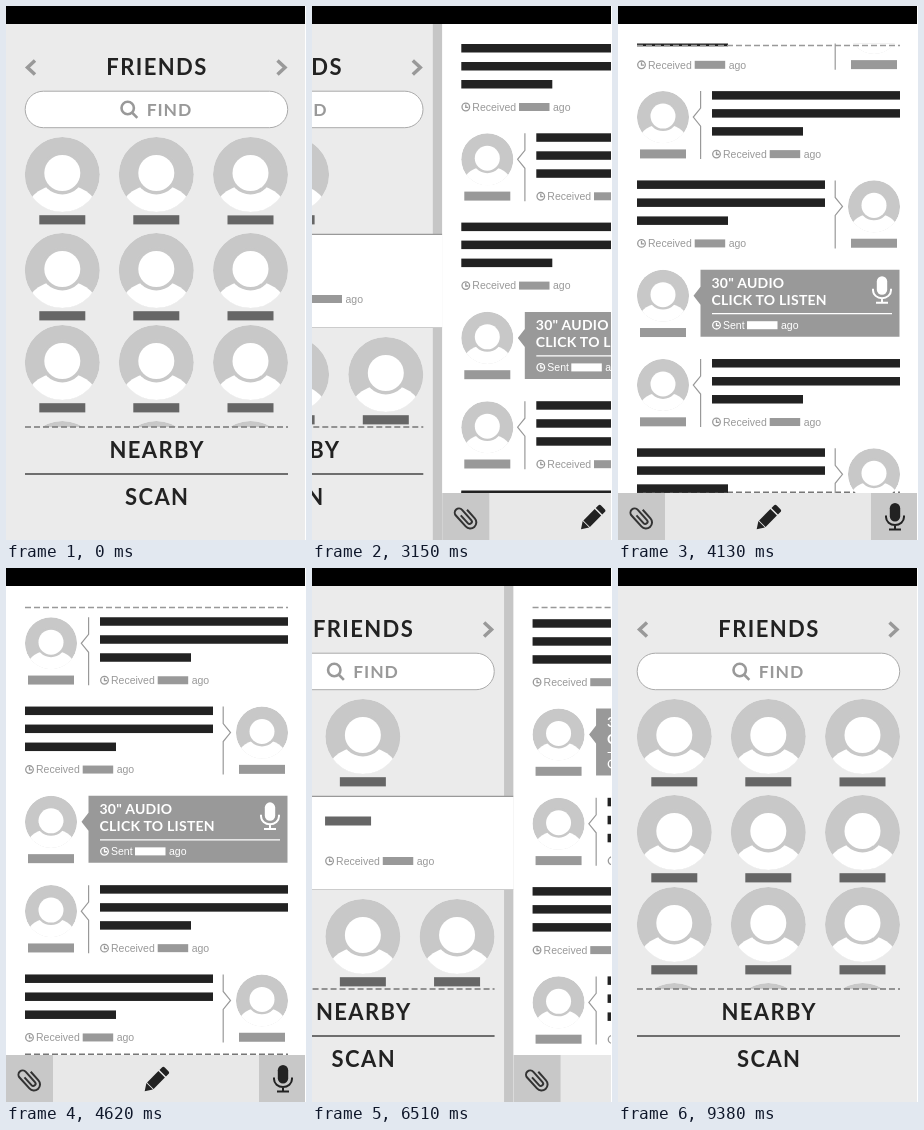
An HTML page for the animation above (9.45 s loop, 300 px wide and 534 px high).

```html
<!DOCTYPE html>
<html lang="en">
<head>
<meta charset="utf-8">
<title>Friends and messages</title>
<style>
  html, body { margin: 0; width: 100%; height: 100%; overflow: hidden; background: #fff; }
  svg { display: block; width: 100%; height: 100%; }
  text { font-family: Lato, "Open Sans", sans-serif; font-weight: 700; }
  .title { font-size: 22px; letter-spacing: 1.4px; fill: #222; text-anchor: middle; }
  .find { font-size: 17.5px; letter-spacing: .9px; fill: #999; }
  .audio { font-size: 14px; letter-spacing: .25px; fill: #fff; }
  .meta { font: 10.5px "Liberation Sans", Arial, sans-serif; }
  .line { fill: none; stroke: #999; }
</style>
</head>
<body>
<svg viewBox="0 0 300 534" preserveAspectRatio="none">
  <defs>
    <clipPath id="disc"><circle r="37.5"/></clipPath>
    <clipPath id="grid"><rect y="18" width="301" height="403"/></clipPath>
    <clipPath id="list"><rect y="37.5" width="300" height="449.5"/></clipPath>
    <g id="avatar" clip-path="url(#disc)">
      <circle r="37.5" fill="#c8c8c8"/>
      <ellipse cy="33" rx="34" ry="23" fill="#fff"/>
      <circle cy="-1.5" r="21.5" fill="#c8c8c8"/>
      <circle cy="-1.5" r="18" fill="#fff"/>
    </g>
    <g id="mic">
      <rect x="-5.2" y="-14" width="10.4" height="18.5" rx="5.2" fill="currentColor"/>
      <path d="M-9-1.5V0a9 8 0 0 0 18 0V-1.5M0 8V12.5M-6 12.6H6" fill="none" stroke="currentColor" stroke-width="2"/>
    </g>
  </defs>
  <g id="friends"></g>
  <g id="chat"></g>
  <rect width="300" height="18"/>
  <rect x="299" width="1" height="534" fill="#fff"/>
</svg>
<script>
const LOOP = 9450, STEP = 70, WIDTH = 301, PITCH = 89.3;
const $ = id => document.getElementById(id);

const rect = (x, y, w, h, fill) =>
  `<rect x="${x}" y="${y}" width="${w}" height="${h}" fill="${fill}"/>`;
const avatar = (x, y, s = 1) =>
  `<use href="#avatar" transform="translate(${x} ${y}) scale(${s})"/>`;
const dashes = (id, y, color) =>
  `<path id="${id}" class="line" d="M19 ${y}H282" style="stroke:${color}" stroke-width="1.4" stroke-dasharray="6 3"/>`;

// Clock, label, covered time and "ago", centred on y
function meta(x, y, label, color) {
  const gap = label === 'Sent' ? 35 : 57.7;
  return `<g fill="${color}">
    <g fill="none" stroke="${color}" stroke-width="1.3">
      <circle cx="${x + 4.5}" cy="${y}" r="3.8"/>
      <path d="M${x + 4.5} ${y - 2.5}V${y + .4}H${x + 7}"/>
    </g>
    <text class="meta" x="${x + 11}" y="${y + 3.8}">${label}</text>
    ${rect(x + gap, y - 4, 30.5, 8, color)}
    <text class="meta" x="${x + gap + 34}" y="${y + 3.8}">ago</text>
  </g>`;
}

const cell = (x, y) =>
  avatar(x, y + 37.5) + rect(x - 23, y + 78.2, 46, 9.2, '#666');
const row = (y, cols = [56.3, 150.3, 244.5]) => cols.map(x => cell(x, y)).join('');

function friendsPage() {
  return rect(0, 18, WIDTH, 516, '#ebebeb') + `
    <rect id="strip" x="291.5" y="18" width="9.5" height="516" fill="#c6c6c6"/>
    <path class="line" stroke-width="3.5" d="M29 54.5L21.5 61.5L29 68.5M271.5 54.5L279 61.5L271.5 68.5"/>
    <text class="title" x="151" y="69">FRIENDS</text>
    <rect x="19.2" y="85.2" width="262.5" height="36.5" rx="18.2" fill="#fff" stroke="#aaa"/>
    <g class="line" stroke-width="2.6">
      <circle cx="121.7" cy="102" r="6.2"/>
      <path d="M126 106.5L131.3 111.8"/>
    </g>
    <text class="find" x="140.7" y="109.7">FIND</text>
    <g clip-path="url(#grid)">
      ${row(131, [56.3, 150.3])}
      <g id="rows">${row(227) + row(319) + row(415)}</g>
    </g>
    <g id="panel">
      <rect id="sheet" y="228" width="${WIDTH}" height="93" fill="#fff"/>
      <path id="top" class="line" d="M0 228.4H${WIDTH}" stroke-width="1.4"/>
      <path id="low" class="line" d="M0 321.5H${WIDTH}" style="stroke:#ccc"/>
      <g id="info">${meta(112.5, 293, 'Received', '#999')}</g>
    </g>
    <g id="face">${avatar(0, 0)}</g>
    <g id="name">${rect(0, 0, 46, 9, '#666')}</g>
    ${dashes('edge', 421, '#777')}
    <text class="title" x="151.2" y="452">NEARBY</text>
    <path class="line" d="M19 468H282" style="stroke:#444" stroke-width="1.4"/>
    <text class="title" x="151.2" y="499">SCAN</text>`;
}

const bars = x => [188, 188, 91].map((w, i) => rect(x, i * 18, w, 8.5, '#222')).join('');
const person = x => avatar(x, 26, .695) + rect(x - 23, 58.3, 46, 9, '#999');
const rule = (x, tip) =>
  `<path class="line" d="M${x} 0V17L${tip} 26L${x} 35V68" stroke-width="1.2"/>`;

const kinds = {
  left: () => person(45) + rule(82.6, 75.3) + bars(94) + meta(94, 63, 'Received', '#999'),
  right: () => person(256) + rule(217.2, 224.5) + bars(19) + meta(19, 63, 'Received', '#999'),
  audio: () => person(45) + `
    <path d="M82.5 0H281.5V67H82.5V35L75.5 26L82.5 17Z" fill="#999"/>
    <text class="audio" x="93.5" y="18.5">30" AUDIO</text>
    <text class="audio" x="93.5" y="35.5">CLICK TO LISTEN</text>
    <path d="M94 44H274" stroke="#fff" stroke-width="1.2"/>
    ${meta(94, 55.5, 'Sent', '#fff')}
    <use href="#mic" x="264" y="20.5" color="#fff"/>`
};

function chatPage() {
  const order = ['right', 'left', 'right', 'audio', 'left', 'right', 'left'];
  const items = order.map((k, i) =>
    `<g transform="translate(0 ${38 + PITCH * i})">${kinds[k]()}</g>`).join('');
  return rect(0, 18, 300, 516, '#fff') + `
    ${dashes('more', 486.3, '#777')}
    <g clip-path="url(#list)"><g id="items">${items}</g></g>
    ${dashes('above', 39.5, '#999')}
    ${rect(0, 487, 300, 47, '#e8e8e8')}
    ${rect(0, 487, 47, 47, '#c8c8c8')}
    ${rect(253, 487, 47, 47, '#c8c8c8')}
    <path transform="translate(23.7 511.7) rotate(-42) scale(1.05)" fill="none" stroke="#333" stroke-width="1.9"
      d="M-2.2-5V5a2.2 2.2 0 0 0 4.4 0V-8a4 4 0 0 0-8 0V6a5.8 5.8 0 0 0 11.6 0V-5"/>
    <path transform="translate(150 512) rotate(-45)" fill="#222"
      d="M-16 0L-9-4.6V4.6ZM-8-4.6H8V4.6H-8ZM9.5-4.6H13a2 2 0 0 1 2 2V2.6a2 2 0 0 1-2 2H9.5Z"/>
    <use href="#mic" x="277" y="511" color="#222"/>`;
}

$('friends').innerHTML = friendsPage();
$('chat').innerHTML = chatPage();

const quint = p => 1 - (1 - p) ** 5;
const cubic = p => p < .5 ? 4 * p ** 3 : 1 - 4 * (1 - p) ** 3;
const mix = (a, b, p) => a + (b - a) * p;

// start, duration, easing, change
const tracks = {
  open: [[420, 700, cubic, 1], [7700, 700, cubic, -1]],
  ready: [[1470, 700, cubic, 1], [6930, 490, cubic, -1]],
  slide: [[3010, 908, quint, 1], [5950, 992, cubic, -1]],
  first: [[3990, 980, quint, 1]],
  second: [[4970, 980, quint, 1]]
};
const at = (name, t) => tracks[name].reduce((sum, [start, dur, ease, by]) =>
  sum + by * ease(Math.min(1, Math.max(0, (t - start) / dur))), 0);

const set = (id, key, value) => $(id).setAttribute(key, value);
const move = (id, x, y) => set(id, 'transform', `translate(${x} ${y})`);

function draw(t) {
  const open = at('open', t), ready = at('ready', t), slide = at('slide', t);
  const first = at('first', t), second = at('second', t);

  move('friends', -WIDTH * slide, 0);
  move('chat', WIDTH * (1 - slide), 0);

  move('rows', 0, 104 * open);
  set('sheet', 'height', 93 * open);
  set('panel', 'opacity', Math.min(1, open * 4));
  set('info', 'opacity', Math.max(0, open * 2 - 1));
  move('face', mix(244.5, 56.3, open), mix(168.5, 273.7, open));
  move('name', mix(221.5, 112.5, open), mix(209.4, 248.5, open));

  for (const id of ['strip', 'top', 'low']) set(id, 'opacity', ready);

  move('items', 0, -(78.5 * first + 86.9 * second));
  set('above', 'opacity', Math.min(1, first * 2));
  set('more', 'opacity', Math.max(0, 1 - second * 1.1));
}

const begin = performance.now();
function tick(now) {
  draw(Math.floor(Math.max(0, now - begin) % LOOP / STEP) * STEP);
  requestAnimationFrame(tick);
}
tick(begin);
</script>
</body>
</html>
```
